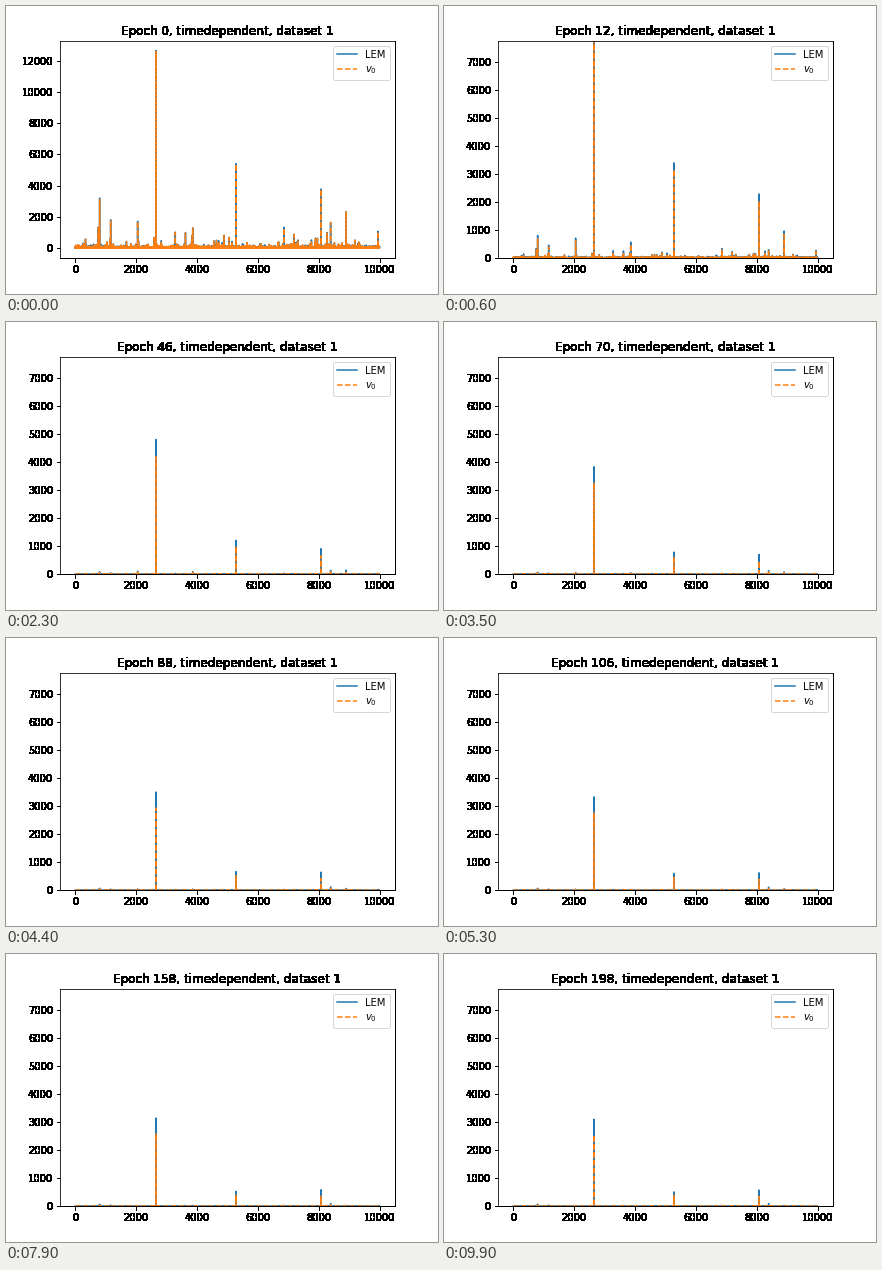
Animation, 432 px wide and 288 px high, one loop 10000 ms. Source, as a matplotlib script:

```python
import numpy as np
import matplotlib.pyplot as plt
from matplotlib.animation import FuncAnimation

FRAMES, INTERVAL, STEP = 100, 100, 2
N = 10000
PEAK = 12650

# position, first height, last height, decay rate, final v0 share
SPIKES = [
    (2654, PEAK, 3050, .040, .82),
    (5279, 5400, 480, .046, .75),
    (8075, 3780, 555, .055, .60),
    (8900, 2330, 10, .080, .55),
    (2050, 1720, 5, .080, .55),
    (3860, 1300, 5, .075, .55),
    (8390, 1650, 80, .200, .55),
]

# Heavy-tailed background with a few taller bursts
rng = np.random.default_rng(4)
noise = 15 * rng.lognormal(sigma=1.1, size=N)
noise[rng.integers(0, N, 25)] = 350 + rng.exponential(400, 25)


def mix(first, last, k):
    return last + (first - last) * k


def curves(epoch):
    lem = noise * mix(1, .02, np.exp(-.12 * epoch))
    settle = np.exp(-epoch / 38)
    v0 = lem * mix(.97, .55, settle)
    for x, first, last, rate, share in SPIKES:
        decay = .94 * np.exp(-rate * epoch) + .06 * np.exp(-.013 * epoch)
        lem[x] = mix(first, last, decay)
        v0[x] = lem[x] * mix(.995, share, settle)
    return lem, v0


def harden(img, dpi):
    """Turn every touched pixel solid black."""
    out = np.zeros_like(img)
    out[..., 3] = img[..., 3] > 0
    return out, 0, 0


plt.rcParams["font.family"] = "DejaVu Sans"
fig = plt.figure(figsize=(6, 4), dpi=72, facecolor="white")
ax = fig.add_axes([.125, .125, .775, .755])

x = np.arange(N)
lem_line, = ax.plot(x, np.zeros(N), color="#1f77b4", label="LEM")
v0_line, = ax.plot(x, np.zeros(N), "--", color="#ff7f0e", label="$v_0$")
ax.legend(loc="upper right")
title = ax.set_title("")

# Everything outside the white plot area has hard edges
for part in (title, ax.xaxis, ax.yaxis, ax.spines["bottom"],
             ax.spines["right"]):
    part.set_agg_filter(harden)


def update(i):
    epoch = i * STEP
    lem, v0 = curves(epoch)
    lem_line.set_ydata(lem)
    v0_line.set_ydata(v0)
    if i == 0:
        ax.set_ylim(-.05 * PEAK, 1.05 * PEAK)
    else:
        ax.set_ylim(0, 7766)
    title.set_text(f"Epoch {epoch}, timedependent, dataset 1")
    return lem_line, v0_line, title


anim = FuncAnimation(fig, update, frames=FRAMES, interval=INTERVAL,
                     repeat=True, repeat_delay=0, blit=False)
plt.show()
```
